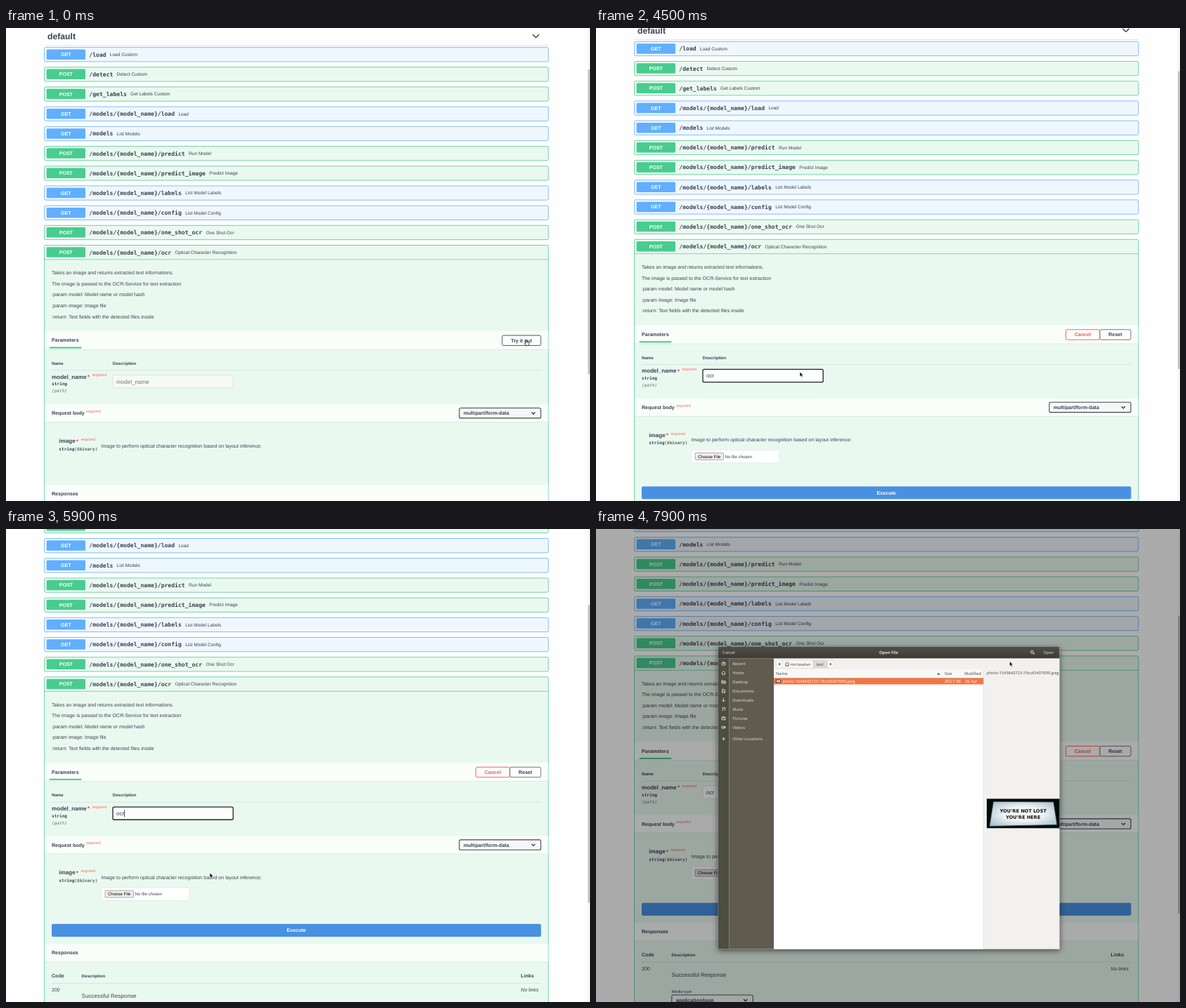
An HTML page for the animation above (8000 ms loop, 831 by 674 pixels).

```html
<!DOCTYPE html>
<html lang="en">
<head>
<meta charset="utf-8">
<title>API docs walkthrough</title>
<style>
  html, body { margin: 0; width: 100%; height: 100%; overflow: hidden; background: #fefefe; }
  svg { display: block; width: 831px; height: 674px; }
  text { font-family: "Liberation Sans", Arial, sans-serif; font-size: 7.08px; fill: #3b4151;
         white-space: pre; text-rendering: geometricPrecision; }
  .b { font-weight: 700; }
  .i { font-style: italic; }
  .mid { text-anchor: middle; }
  .mono { font-family: "DejaVu Sans Mono", monospace; }
  .ui { font-family: "Open Sans", "Noto Sans", sans-serif; }
  .sign { font-family: "DejaVu Sans", sans-serif; font-weight: 700; }
</style>
</head>
<body>
<svg id="stage" viewBox="0 0 831 674" xmlns="http://www.w3.org/2000/svg">
  <defs>
    <linearGradient id="bar" x2="0" y2="1"><stop stop-color="#504e45"/><stop offset="1" stop-color="#3d3b36"/></linearGradient>
    <radialGradient id="glow" r=".65"><stop offset=".4" stop-color="#f3f8f9"/><stop offset="1" stop-color="#a9bfcb"/></radialGradient>
    <filter id="shadow" x="-10%" y="-10%" width="120%" height="120%">
      <feDropShadow dx="0" dy="2" stdDeviation="4" flood-opacity=".6"/>
    </filter>
    <clipPath id="frame"><rect x="173.5" y="168" width="486" height="430.5"/></clipPath>
  </defs>
</svg>
<script>
const LOOP = 8000;
const INK = '#3b4151', GREEN = '#49cc90', BLUE = '#61affe', RED = '#f66';
const stage = document.getElementById('stage');

function add(parent, tag, attrs, content) {
  const node = document.createElementNS('http://www.w3.org/2000/svg', tag);
  for (const key in attrs) node.setAttribute(key, attrs[key]);
  if (content !== undefined) node.textContent = content;
  return parent.appendChild(node);
}
const group = parent => add(parent, 'g', {});
const rect = (g, x, y, right, bottom, fill, more = {}) =>
  add(g, 'rect', { x, y, width: right - x, height: bottom - y, fill, ...more });
const line = (g, d, stroke, width = .7) =>
  add(g, 'path', { d, stroke, 'stroke-width': width, fill: 'none' });
const shape = (g, d, fill, more = {}) => add(g, 'path', { d, fill, ...more });
const text = (g, x, y, content, cls = '', size = 7.08, fill = INK) =>
  add(g, 'text', { x, y, class: cls, style: `font-size:${size}px;fill:${fill}` }, content);
const chevron = (g, x, y, r, width = 1.1) =>
  line(g, `M${x - r} ${y - r / 2}l${r} ${r}l${r} ${-r}`, '#222', width);
const show = (node, on) => node.setAttribute('display', on ? 'inline' : 'none');
const move = (node, x, y) => node.setAttribute('transform', `translate(${x} ${y})`);

const page = group(stage);

function drawRows() {
  text(page, 59, 16, 'default', 'b', 12.2);
  chevron(page, 754, 11.5, 4.5);
  line(page, 'M54.5 25H772', '#c9cbd0', .6);
  const model = '/models/{model_name}/';
  const rows = [
    ['GET', '/load', 'Load Custom'],
    ['POST', '/detect', 'Detect Custom'],
    ['POST', '/get_labels', 'Get Labels Custom'],
    ['GET', model + 'load', 'Load'],
    ['GET', '/models', 'List Models'],
    ['POST', model + 'predict', 'Run Model'],
    ['POST', model + 'predict_image', 'Predict Image'],
    ['GET', model + 'labels', 'List Model Labels'],
    ['GET', model + 'config', 'List Model Config'],
    ['POST', model + 'one_shot_ocr', 'One Shot Ocr'],
    ['POST', model + 'ocr', 'Optical Character Recognition'],
  ];
  rows.forEach(([method, path, label], i) => {
    const y = 37.7 + i * 28.19, get = method === 'GET', color = get ? BLUE : GREEN;
    const bottom = i === rows.length - 1 ? 1100 : y + 10.2;
    rect(page, 54.6, y - 10.1, 771.8, bottom, get ? '#eff7fe' : '#eaf9f0',
      { rx: 2, stroke: color, 'stroke-width': .8 });
    rect(page, 57.7, y - 7.3, 113, y + 7.2, color, { rx: 1.5 });
    text(page, 85.3, y + 2.5, method, 'b mid', 7.08, '#fff');
    text(page, 118.3, y + 2.9, path, 'mono b', 8.11);
    text(page, 123.4 + path.length * 4.88, y + 2.3, label, '', 6.59);
  });
  line(page, 'M54.6 329.9H771.8', GREEN);
}

function strip(g, top, bottom) {
  rect(g, 55, top, 771.4, bottom, '#fafefb');
  line(g, `M55 ${bottom + .3}H771.4`, '#d5e3da', .7);
}

function required(g, x, y, star = true) {
  if (star) text(g, x - 6.8, y + 3.6, '*', 'b', 8.5, '#f44');
  text(g, x, y, 'required', '', 5.6, RED);
}

function select(g, x, y, right, label, stroke) {
  rect(g, x, y, right, y + 14.4, '#f6f8f7', { rx: 2, stroke, 'stroke-width': 1.1 });
  text(g, x + 6, y + 9.7, label, 'b');
  chevron(g, right - 10.6, y + 7.3, 2.6);
}

function button(g, x, right, label, stroke, fill = INK) {
  rect(g, x, 438, right, 452.4, '#fcfefd', { rx: 2, stroke, 'stroke-width': 1 });
  text(g, (x + right) / 2, 447.6, label, 'b mid', 7.08, fill);
}

function drawOperation() {
  ['Takes an image and returns extracted text informations.',
   'The image is passed to the OCR-Service for text extraction',
   ':param model: Model name or model hash',
   ':param image: Image file',
   ':return: Text fields with the detected files inside',
  ].forEach((s, i) => text(page, 65, 351.3 + i * 15.55, s, '', 7.05));

  strip(page, 432, 458);
  text(page, 65, 447.4, 'Parameters', 'b');
  rect(page, 61.7, 454.5, 107.3, 456.6, GREEN);
  text(page, 65, 479.8, 'Name', 'b', 6.1);
  text(page, 151.8, 479.8, 'Description', 'b', 6.1);
  line(page, 'M65 487.8H761', '#c6d6ce', .6);
  text(page, 65, 499.6, 'model_name', 'b', 8.1);
  required(page, 122.5, 496.4);
  text(page, 65, 509.3, 'string', 'mono b', 6.1);
  text(page, 65, 519.2, '(path)', 'mono i', 6.1, '#666b75');

  strip(page, 536.5, 561.3);
  text(page, 65, 551.2, 'Request body', 'b');
  required(page, 114, 548, false);
  select(page, 645, 541.5, 761, 'multipart/form-data', '#41444e');
  text(page, 75.3, 591, 'image', 'b', 8.1);
  required(page, 106.5, 588);
  text(page, 75.3, 601.6, 'string', 'mono b', 6.1);
  text(page, 97.3, 601.6, '($binary)', 'mono b', 6.1, '#606060');
  text(page, 135.5, 597.6, 'Image to perform optical character recognition based on layout inference:', '', 7.05);
}

drawRows();
drawOperation();

const idle = group(page);
button(idle, 706, 761, 'Try it out', '#555');
strip(idle, 651, 676.5);
text(idle, 65, 666, 'Responses', 'b');

const active = group(page);
button(active, 717, 761, 'Reset', '#777');
button(active, 668.6, 716.6, 'Cancel', '#ff6060', '#ee5a4a');
rect(active, 135.6, 609.6, 261, 628, '#fff', { rx: 2, stroke: '#dcdfdd', 'stroke-width': .6 });
const chooser = rect(active, 141, 613.8, 181.4, 623.7, '#efefef', { rx: 1, stroke: '#767676', 'stroke-width': .6 });
text(active, 161.2, 620.9, 'Choose File', 'mid', 6.1, '#000');
text(active, 183.5, 621, 'No file chosen', '', 6.1);
rect(active, 65, 661.4, 761.4, 679.6, '#4990e2', { rx: 2 });
text(active, 413.2, 673, 'Execute', 'b mid', 7.08, '#fff');
strip(active, 690, 715.5);
text(active, 65, 704.5, 'Responses', 'b');
text(active, 65, 737.8, 'Code', 'b');
text(active, 107.6, 737.5, 'Description', 'b', 6.1);
text(active, 732.6, 737.8, 'Links', 'b');
line(active, 'M65 746H761', '#c6d6ce', .6);
text(active, 65, 757.4, '200');
text(active, 732.6, 757.4, 'No links', 'i');
text(active, 107.6, 766.4, 'Successful Response', '', 8.1);
text(active, 107.6, 790, 'Media type', '', 5.8);
select(active, 107.8, 792.6, 223.3, 'application/json', '#2f6b50');

const field = rect(page, 152, 494.7, 323.2, 512.9, '#fff', { rx: 2 });
const value = text(page, 157, 506.6, '', '', 8.1);
const squiggle = line(page, 'M157 509' + 'l1 -.8l1 .8'.repeat(6), '#e33', .6);
const caret = rect(page, 0, 499, .8, 509, '#111');

rect(stage, 827.6, 0, 831, 674, '#f5f5f5');
const thumb = rect(stage, 828.2, 0, 830.7, 424, '#bdbdbd');
const dim = rect(stage, 0, 0, 831, 674, '#000');
const dialog = group(stage);
dialog.setAttribute('filter', 'url(#shadow)');

function drawDialog() {
  const g = add(dialog, 'g', { 'clip-path': 'url(#frame)' });
  const ui = (x, y, s, fill = '#45423c', cls = '', size = 5.75) => text(g, x, y, s, 'ui ' + cls, size, fill);
  const pale = '#e6e3da';
  rect(g, 173.5, 168, 660, 599, '#f2f1f0');
  rect(g, 173.5, 168, 660, 184.3, 'url(#bar)');
  ui(180, 178.2, 'Cancel', pale);
  ui(416.5, 178.2, 'Open File', pale, 'b mid');
  ui(636.5, 178.2, 'Open', pale);
  add(g, 'circle', { cx: 620.4, cy: 175.2, r: 1.9, fill: 'none', stroke: pale });
  line(g, 'M621.8 176.6l2 2', pale, 1.2);

  rect(g, 173.5, 184.3, 189.4, 599, '#4e4d43');
  rect(g, 189.4, 184.3, 253, 599, '#5e5c4f');
  const icons = [
    'M179 192a2.5 2.5 0 1 0 5 0a2.5 2.5 0 1 0 -5 0M181.5 190v2h1.5',
    'M178.8 205l2.7 -2.5l2.7 2.5M179.7 205v2.3h3.6v-2.3',
    'M179 220v-4h2l.6 .8h2.6v3.2zM179 218h5',
    'M179.6 228.5h3l1 1v3.8h-4zM180.5 231h2',
    'M181.5 241v5M179.5 244l2 2l2 -2',
    'M180.3 258.5v-4h3.2v3.6M179.5 258.5h1M182.5 258h1',
    'M179 268.3h5v3.6h-5zM180.5 268l.5 -.8h1l.5 .8M180.8 270h1.4',
    'M179 281.2h3v2.8h-3zM182 282.6l2 -1.2v2.6z',
    'M181.5 296.8v4.6M179.2 299h4.6',
  ];
  ['Recent', 'Home', 'Desktop', 'Documents', 'Downloads', 'Music', 'Pictures', 'Videos', 'Other Locations']
    .forEach((s, i) => {
      ui(194.2, i === 8 ? 301 : 193.8 + i * 12.97, s, pale);
      line(g, icons[i], pale, .9);
    });

  rect(g, 256, 186.8, 338.5, 198.2, '#f8f7f6', { rx: 1.5, stroke: '#d2cfca', 'stroke-width': .5 });
  rect(g, 309, 187, 329, 198, '#dcdad6');
  line(g, 'M265.5 187v11M309 187v11M329 187v11', '#d2cfca', .5);
  shape(g, 'M262 190.5v4l-2.4 -2zM333 190.5v4l2.2 -2z', '#45423c');
  line(g, 'M269 192.5l3 -2.6l3 2.6M270 192.5v2.6h4v-2.6', '#45423c', .9);
  ui(276.5, 194.6, 'mirtavelan');
  ui(313.5, 194.6, 'test');

  rect(g, 253, 200.6, 551.5, 599, '#fff');
  rect(g, 253, 200.6, 551.5, 212, '#f8f8f7');
  ui(256, 208.3, 'Name');
  ui(496, 208.3, 'Size');
  ui(524.3, 208.3, 'Modified');
  shape(g, 'M485.4 207.5h4.2l-2.1 -2.8z', '#45423c');
  rect(g, 253, 212.2, 551.5, 221.4, '#f07746');
  rect(g, 256.3, 215, 262.3, 218.8, '#fff', { stroke: '#222', 'stroke-width': .8 });
  line(g, 'M257.5 217h3.6', '#555', .6);
  const file = 'photo-1543643723-19cc65407699.jpeg';
  ui(265.8, 218.9, file, '#fff', '', 5.7);
  ui(496, 218.9, '253.7 kB', '#fff');
  ui(525, 218.9, '26 Apr', '#fff');
  line(g, 'M551.5 200.6V599', '#d8d5d0', .6);
  ui(556, 206.6, file, '#45423c', '', 5.7);

  rect(g, 556, 384.4, 660, 426.3, '#050708');
  shape(g, 'M565.5 388.5L651 389L656 421.5L560 423.5Z', 'url(#glow)', { stroke: '#3a4a54', 'stroke-width': .8 });
  text(g, 607.8, 403.7, 'YOU’RE NOT LOST', 'sign mid', 6.55, '#111');
  text(g, 607.8, 412.8, 'YOU’RE HERE', 'sign mid', 6.55, '#111');
}
drawDialog();

const outline = { stroke: '#fff', 'stroke-width': .6, 'stroke-linejoin': 'round' };
const pointers = {
  arrow: shape(stage, 'M0 0V7L1.6 5.5L2.7 8L3.9 7.4L2.9 5.1H5.1Z', '#111', outline),
  hand: shape(stage, 'M-.8 0Q0 -.8 .6 0V3L3.2 3.6Q4 4 3.8 5.2L3.2 8H-.6L-2.6 5Q-2.4 4 -.8 4.8Z', '#fff',
    { stroke: '#111', 'stroke-width': .8, 'stroke-linejoin': 'round' }),
  beam: line(stage, 'M-1.8 -3.8H-.5L0 -3.4L.5 -3.8H1.8M0 -3.4V3.4M-1.8 3.8H-.5L0 3.4L.5 3.8H1.8', '#222', .9),
};

// Linear interpolation through [time, value] points.
function track(points, t) {
  const next = points.findIndex(p => p[0] > t);
  if (next === 0) return points[0][1];
  if (next < 0) return points[points.length - 1][1];
  const [t0, a] = points[next - 1], [t1, b] = points[next];
  return a + (b - a) * (t - t0) / (t1 - t0);
}
const SCROLL = [[4300, 0], [4400, 3], [4800, 24], [5300, 66], [5500, 86], [5800, 86], [6100, 124], [6200, 124], [6300, 128.6]];
const CURSOR_X = [[600, 740.5], [700, 720], [1000, 500], [1200, 345], [1400, 267], [1500, 268], [3900, 268], [4100, 290],
  [6200, 290], [6300, 266], [6700, 180], [6900, 177], [7300, 177], [7500, 270], [7700, 480], [7900, 588.5]];
const CURSOR_Y = [[600, 444.5], [1000, 485], [1400, 520], [1500, 512], [3900, 512], [4100, 490],
  [6200, 490], [6300, 491], [6900, 486.5], [7300, 486.5], [7500, 425], [7700, 270], [7900, 188.5]];
const DIM = [[7100, 0], [7200, .03], [7300, .09], [7600, .33]];

function render(now) {
  const t = Math.floor(now % LOOP / 100) * 100;
  const within = (from, to) => t >= from && t < to;
  const open = t >= 600, scroll = track(SCROLL, t);
  move(page, 0, -scroll);
  show(idle, !open);
  show(active, open);
  thumb.setAttribute('y', open ? 57.5 + scroll * .515 : 59);
  thumb.setAttribute('height', open ? 424 : 434);

  const focused = within(1900, 7200);
  field.setAttribute('fill', open ? '#fff' : '#f6faf7');
  field.setAttribute('stroke', focused ? '#222' : '#d4d8d6');
  field.setAttribute('stroke-width', focused ? 1.3 : .7);
  const typed = 'ocr'.slice(0, t < 3100 ? 0 : t < 3600 ? 1 : t < 3900 ? 2 : 3);
  value.textContent = typed || 'model_name';
  value.style.fill = typed ? INK : '#757575';
  caret.setAttribute('x', [157.2, 161.3, 165.2, 168.1][typed.length]);
  show(caret, within(1900, 2400) || within(3100, 4400) || within(5700, 6900));
  show(squiggle, within(6100, 7200));
  chooser.setAttribute('fill', t >= 6700 ? '#dcdcdc' : '#efefef');

  dim.setAttribute('opacity', track(DIM, t));
  show(dialog, t >= 7200);
  dialog.setAttribute('opacity', t < 7300 ? .6 : 1);

  const kind = t < 700 ? 'hand' : within(1500, 4000) ? 'beam' : 'arrow';
  for (const name in pointers) show(pointers[name], name === kind);
  move(pointers[kind], track(CURSOR_X, t), track(CURSOR_Y, t));
}

const start = performance.now();
function tick() {
  render(performance.now() - start);
  requestAnimationFrame(tick);
}
tick();
</script>
</body>
</html>
```
